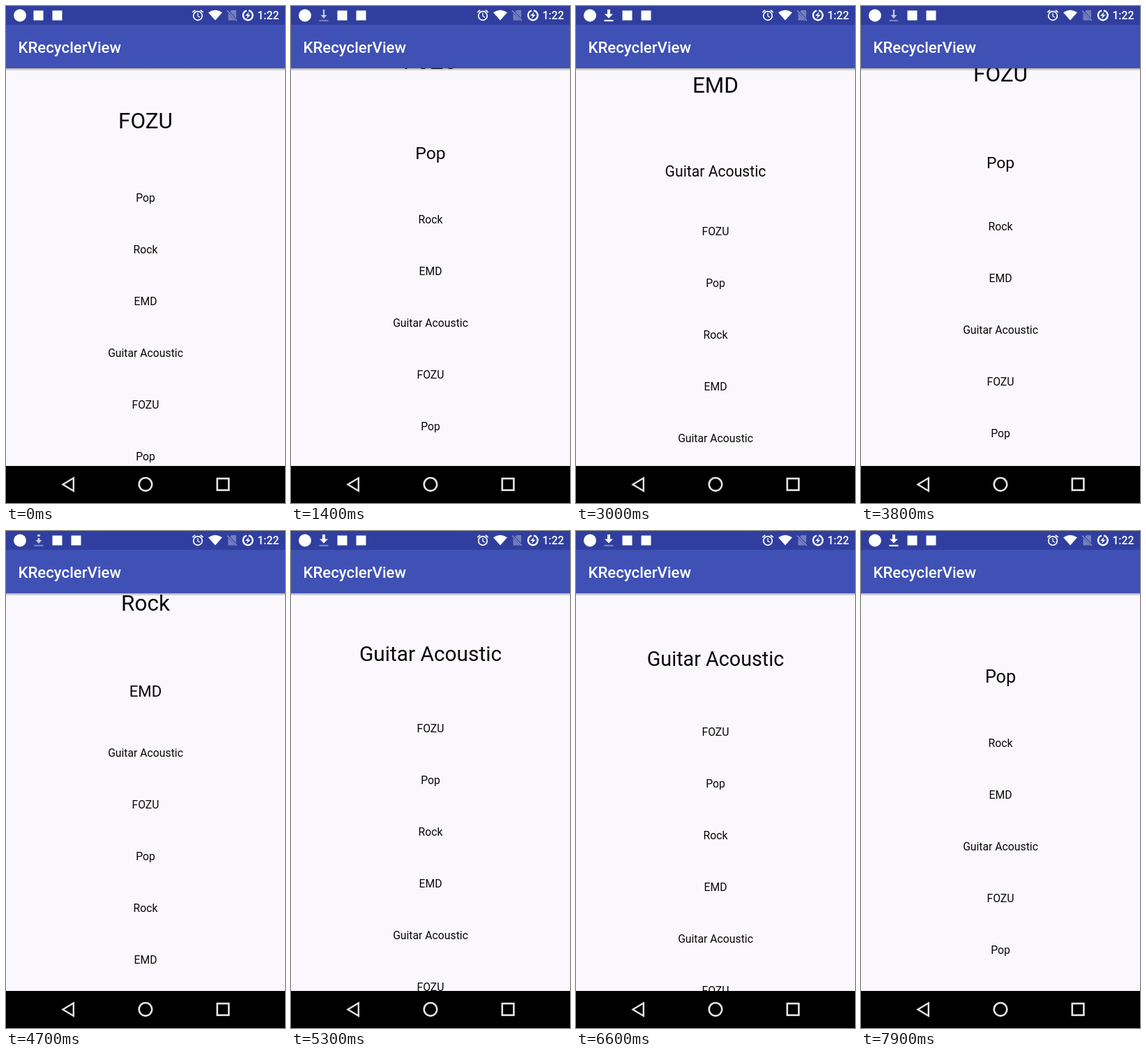
Animation, 400 px wide and 711 px high, one loop 8 s. Source, as an HTML page with a canvas:

```html
<!DOCTYPE html>
<html lang="en">
<head>
<meta charset="utf-8">
<title>KRecyclerView</title>
<style>
html, body { margin: 0; width: 100%; height: 100%; overflow: hidden; background: #000; }
canvas { display: block; width: 100vw; height: 100vh; }
</style>
</head>
<body>
<canvas id="stage"></canvas>
<script>
const W = 400, H = 711, LOOP = 8000, STEP = 100;
const LIST_TOP = 89, LIST_END = 658, ROW = 74, TEXT = 15.75;
const NAMES = ["FOZU", "Pop", "Rock", "EMD", "Guitar Acoustic"];

// scroll position in rows over time (ms)
const SCROLL = [
  [0, 0], [900, 0], [1000, 0.05], [1200, 0.32], [1400, 0.574], [1500, 0.574],
  [1600, 0.68], [1800, 1.4], [2100, 2.25], [2400, 2.72], [2800, 2.93], [2900, 2.93],
  [3000, 3.345], [3400, 4.5], [3800, 5.45], [4700, 7.41], [5200, 8.7], [5600, 9.5],
  [6000, 12.05], [6600, 13.824], [7100, 15.2], [7400, 15.59], [7700, 15.6], [8000, 15.6]
];

const canvas = document.getElementById("stage");
const ctx = canvas.getContext("2d");

const slope = k => (SCROLL[k + 1][1] - SCROLL[k][1]) / (SCROLL[k + 1][0] - SCROLL[k][0]);

// harmonic mean keeps the curve monotone
function tangent(k) {
  if (k === 0 || k === SCROLL.length - 1) return 0;
  const a = slope(k - 1), b = slope(k);
  return a * b > 0 ? 2 * a * b / (a + b) : 0;
}

function scrollAt(t) {
  let k = 0;
  while (k < SCROLL.length - 2 && SCROLL[k + 1][0] <= t) k++;
  const [t0, p0] = SCROLL[k], [t1, p1] = SCROLL[k + 1];
  const h = t1 - t0, u = (t - t0) / h, v = 1 - u;
  return p0 * v * v * (1 + 2 * u) + p1 * u * u * (3 - 2 * u)
    + h * u * v * (tangent(k) * v - tangent(k + 1) * u);
}

function rect(x, y, w, h, color) {
  ctx.fillStyle = color;
  ctx.fillRect(x, y, w, h);
}

function poly(points, color) {
  ctx.beginPath();
  points.forEach(([x, y]) => ctx.lineTo(x, y));
  ctx.closePath();
  ctx.fillStyle = color;
  ctx.fill();
}

function arc(x, y, r, width, from = 0, to = Math.PI * 2) {
  ctx.beginPath();
  ctx.arc(x, y, r, from, to);
  ctx.lineWidth = width;
  ctx.stroke();
}

function line(points, width) {
  ctx.beginPath();
  points.forEach(([x, y]) => ctx.lineTo(x, y));
  ctx.lineWidth = width;
  ctx.stroke();
}

function label(text, x, y, size, weight, color, align) {
  ctx.font = `${weight} ${size}px Roboto, sans-serif`;
  ctx.textAlign = align;
  ctx.fillStyle = color;
  ctx.fillText(text, x, y);
}

function drawList(pos) {
  const first = Math.floor(pos);
  let y = LIST_TOP - (pos - first) * ROW * 2;
  ctx.save();
  ctx.beginPath();
  ctx.rect(0, LIST_TOP, W, LIST_END - LIST_TOP);
  ctx.clip();
  for (let i = first; y < LIST_END; i++) {
    const scale = Math.min(2, Math.max(1, 1 + (LIST_TOP + 2 * ROW - y) / (2 * ROW)));
    const size = TEXT * scale, height = ROW * scale;
    label(NAMES[i % NAMES.length], W / 2, y + height / 2 + size * 0.37, size, 400, "#080808", "center");
    y += height;
  }
  ctx.restore();
}

function drawDownload(phase) {
  const x = 47, dim = "rgba(255,255,255,.35)";
  rect(x - 6.5, 19.8, 13, 2.2, phase ? dim : "#fff");
  if (phase === 0 || phase === 5) {
    rect(x - 2, 5, 4, 7, "#fff");
    poly([[x - 6, 11.5], [x + 6, 11.5], [x, 17.5]], "#fff");
    return;
  }
  const soft = "rgba(255,255,255,.7)";
  if (phase > 2) {
    rect(x - 1.2, 5, 2.4, 9, soft);
  } else {
    rect(x - 2, 5, 4, 3, soft);
    if (phase === 2) rect(x - 1.5, 10, 3, 4, soft);
  }
  if (phase > 1) poly([[x - 4.5, 13], [x + 4.5, 13], [x, 18]], soft);
}

function drawStatus(t) {
  rect(0, 0, W, 27, "#303f9f");
  ctx.strokeStyle = ctx.fillStyle = "#fff";
  ctx.beginPath();
  ctx.arc(20, 13.5, 9, 0, Math.PI * 2);
  ctx.fill();

  const busy = t >= 600, shift = busy ? 27 : 0;
  if (busy) drawDownload(Math.floor((t - 550) / 204) % 6);
  rect(39.5 + shift, 6.5, 14, 14, "#fff");
  rect(66.5 + shift, 6.5, 14, 14, "#fff");

  // alarm clock
  arc(275, 14, 6.3, 1.7);
  line([[275, 10], [275, 14.4], [278, 16.3]], 1.3);
  line([[267.4, 9], [271.2, 5.8]], 1.7);
  line([[282.6, 9], [278.8, 5.8]], 1.7);

  // wireless signal
  ctx.beginPath();
  ctx.moveTo(300, 20.5);
  ctx.lineTo(290, 9.3);
  ctx.quadraticCurveTo(300, 2.2, 310, 9.3);
  ctx.closePath();
  ctx.fillStyle = "#fff";
  ctx.fill();

  // missing card
  const faint = "rgba(255,255,255,.33)";
  poly([[321, 8], [323.5, 6], [330, 6], [330, 17.5]], faint);
  poly([[318.5, 10], [329, 20.5], [318.5, 20.5]], faint);
  ctx.strokeStyle = "rgba(255,255,255,.45)";
  line([[317, 6.5], [331, 21]], 1.3);

  // power ring
  ctx.strokeStyle = "#fff";
  arc(346.8, 13.3, 6.9, 2.4, -1.4, 4.45);
  poly([[348.5, 8.5], [343, 14], [346.4, 14], [345, 18.3], [350.6, 12.6], [347.2, 12.6]], "#fff");

  label("1:22", 391.3, 19.3, 15.7, 500, "#fff", "right");
}

function drawNav() {
  rect(0, LIST_END, W, H - LIST_END, "#000");
  ctx.strokeStyle = "#e6e6e6";
  ctx.lineWidth = 2.4;
  ctx.beginPath();
  ctx.moveTo(81.5, 684.5);
  ctx.lineTo(96.8, 675.3);
  ctx.lineTo(96.8, 693.7);
  ctx.closePath();
  ctx.stroke();
  arc(200, 684.3, 9.3, 2.6);
  ctx.strokeRect(302.8, 676, 16.6, 16.6);
}

function draw(t) {
  const scale = window.devicePixelRatio || 1;
  const w = Math.round(innerWidth * scale), h = Math.round(innerHeight * scale);
  if (canvas.width !== w || canvas.height !== h) {
    canvas.width = w;
    canvas.height = h;
  }
  ctx.setTransform(w / W, 0, 0, h / H, 0, 0);

  rect(0, 0, W, H, "#faf8fd");
  drawList(scrollAt(t));

  const shade = ctx.createLinearGradient(0, LIST_TOP, 0, LIST_TOP + 4);
  shade.addColorStop(0, "rgba(0,0,0,.32)");
  shade.addColorStop(1, "rgba(0,0,0,0)");
  rect(0, LIST_TOP, W, 4, shade);
  rect(0, 27, W, LIST_TOP - 27, "#3f51b5");
  label("KRecyclerView", 17.5, 66.5, 22.2, 500, "#fff", "left");

  drawStatus(t);
  drawNav();
}

const start = performance.now();
function tick() {
  const t = (performance.now() - start) % LOOP;
  draw(Math.floor(t / STEP) * STEP);
  requestAnimationFrame(tick);
}
tick();
</script>
</body>
</html>
```
